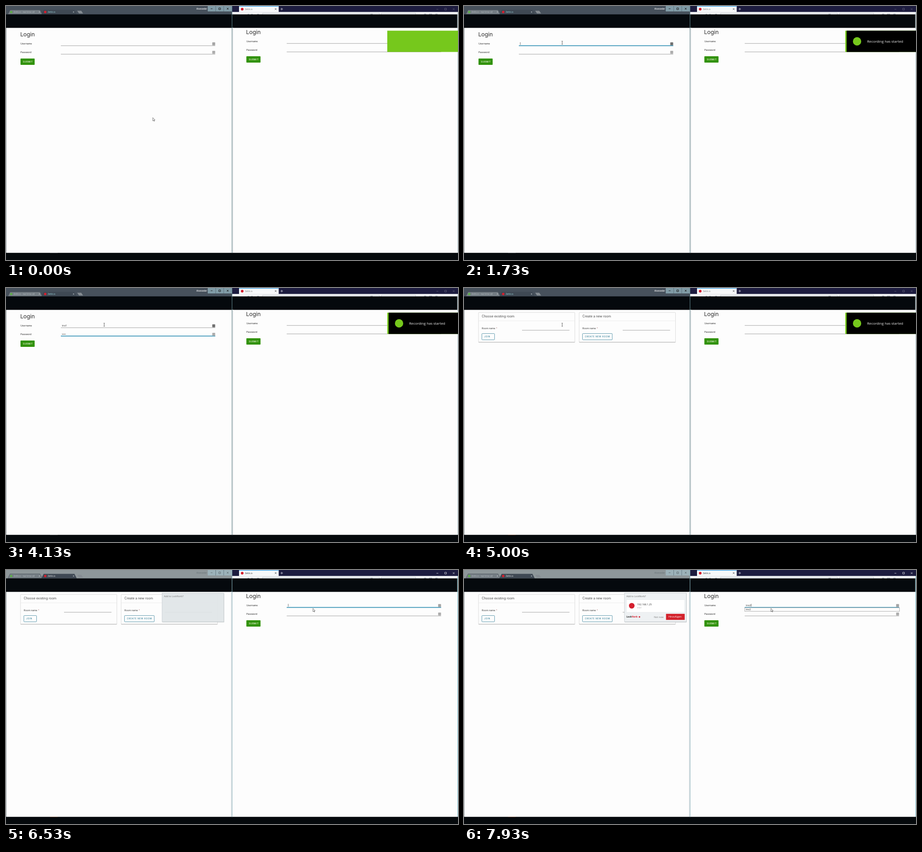
Animation, 997 px wide and 561 px high, one loop 8000 ms. Source, as an HTML page:

```html
<!DOCTYPE html>
<html lang="en">
<head>
<meta charset="utf-8">
<title>Login demo</title>
<style>
html, body { margin: 0; width: 100%; height: 100%; overflow: hidden; background: #fdfdfd; }
svg { display: block; width: 100vw; height: 100vh; }
text { font-family: Inter, "Open Sans", sans-serif; white-space: pre; }
.ui { font-family: "Open Sans", "Noto Sans", sans-serif; }
.btn { font-weight: 500; letter-spacing: .14em; font-size: 4.67px; }
</style>
</head>
<body>
<svg id="stage" viewBox="0 0 997 561" preserveAspectRatio="none"></svg>
<script>
const LOOP = 8000;
const SITE = 'Zeltik.io', USER1 = 'trio1', USER2 = 'trio2';
const RED = '#d4202f', GREEN = '#76c81c', TEAL = '#36809a';

const rect = (x, y, w, h, fill, more = '') =>
  `<rect x="${x}" y="${y}" width="${w}" height="${h}" fill="${fill}" ${more}/>`;
const text = (x, y, size, fill, str, more = '') =>
  `<text x="${x}" y="${y}" font-size="${size}" fill="${fill}" ${more}>${str}</text>`;
const ui = (x, y, size, fill, str, more = '') => text(x, y, size, fill, str, 'class="ui" ' + more);
const dot = (x, y, r, fill) => `<circle cx="${x}" cy="${y}" r="${r}" fill="${fill}"/>`;
const line = (d, stroke, w = .8, more = '') =>
  `<path d="${d}" fill="none" stroke="${stroke}" stroke-width="${w}" ${more}/>`;
const group = (id, body, more = '') => `<g id="${id}" ${more}>${body}</g>`;
const cross = (x, y, r, c, w) => line(`M${x - r} ${y - r}l${2 * r} ${2 * r}m0 ${-2 * r}l${-2 * r} ${2 * r}`, c, w);
const icon = (x, y, fill, id = '') => rect(x, y, 6.4, 6.4, fill, `rx=".8" ${id && `id="${id}"`}`);

// Login form, placed by the left end and baseline of its heading
function login(x, y, key) {
  const fx = x + 89, fw = 340.5;
  const label = (dy, s) => text(x, y + dy, 5.2, '#222', s);
  const field = (dy, id) =>
    rect(fx, y + dy, fw, .9, '#999') + rect(fx, y + dy - .5, 0, 1.6, '#2c8fb5', `id="${key}${id}Line"`);
  return text(x - .6, y, 12.3, '#2b2b2b', 'Login')
    + label(18.8, 'Username') + label(37.6, 'Password')
    + field(20.8, 'User') + field(39.4, 'Pass')
    + icon(fx + 334, y + 13.8, '#a5a5a5', key + 'Icon') + icon(fx + 334, y + 32.5, '#adadad')
    + rect(x, y + 49.6, 31.2, 14, '#319207', 'rx="1"')
    + text(x + 5.2, y + 58.4, 4.67, '#fff', 'SUBMIT', 'class="btn"')
    + text(fx + 2.5, y + 18.8, 5.2, '#333', '', `id="${key}User"`);
}

function card(x, title, button, bw) {
  return rect(x, 54, 212.5, 65.8, '#fdfdfd', 'stroke="#d2d2d2" stroke-width=".8" rx="1"')
    + rect(x, 119.2, 212.5, 1, '#adadad') + rect(x, 72.2, 212.5, .6, '#e4e4e4')
    + text(x + 7.3, 65.2, 7, '#444', title)
    + text(x + 7.3, 91, 5.3, '#333', 'Room name') + text(x + 38.8, 91, 5, '#a66', '*')
    + rect(x + 96, 92.8, 104.6, .9, '#999')
    + rect(x + 7.4, 100.6, bw, 13.8, '#fdfdfd', `rx="1" stroke="${TEAL}" stroke-width=".8"`)
    + text(x + 12.4, 109.2, 4.67, TEAL, button, 'class="btn"');
}

function leftBar() {
  return rect(0, 0, 498, 19, '#47515c', 'id="bar"')
    + '<path d="M4 18.5L9 8.5H75L80 18.5Z" fill="#747d84" stroke="#343c45" stroke-width=".5"/>'
    + '<path d="M78 18.5L83 8.5H151L156 18.5Z" fill="#3f4954"/>'
    + '<path d="M157 10.5H166L170 16.5H161Z" fill="#858c92"/>'
    + dot(11.5, 13.3, 2.6, '#5fae4b') + ui(16.5, 15, 4.5, '#b9c0c5', SITE + ' - real time coll')
    + cross(73.7, 13.3, 1.3, '#d8dcdf', .7)
    + dot(86.5, 13.3, 2.7, RED) + ui(92, 15, 4.6, '#9fdbe2', SITE, 'id="leftTab"')
    + cross(149, 13.3, 1.3, '#dde2e6', .7)
    + ui(420, 8, 4.4, '#fff', 'Alvorander', 'id="owner" font-weight="600"')
    + rect(445, 0, 53, 12, '#809ba6', 'id="winButtons"')
    + line('M462.5 0V12M480.2 0V12', '#52656f', .7)
    + group('winGlyphs', line('M451.5 6H455.5M469.4 4.2h3.8v3.8h-3.8z', '#111', .9) + cross(489, 6, 1.9, '#111', .9));
}

function rightBar() {
  return rect(499, 0, 498, 13.5, '#1d1c3f') + rect(499, 13.3, 498, 5.7, '#f3f5f7')
    + rect(514, 0, 87.5, 13.5, '#f7f8f9') + rect(514, 0, 87.5, 1.1, '#1593e6')
    + dot(521, 7, 3, RED) + ui(527, 8.8, 4.6, '#777', SITE, 'id="rightTab"')
    + cross(594.8, 6.8, 1.8, '#333', .8) + line('M605.5 6.8h5.4M608.2 4.1v5.4', '#e8e8f0', .8)
    + line('M566 19V15.8H823.5V19M828 19V15.8H903.5V19', '#b8bcc2', .7)
    + group('foxGlyphs', line('M949.5 7.2h4M967.7 5h3.8v3.8h-3.8z', '#fff', .7) + cross(987.5, 7, 1.9, '#fff', .7))
    + line('M533 18.2h3M541 18.2h3M554 18.2h4M804 18.2h5M922 18h5M933 18h7M947 18h5', '#59616c', .8);
}

const popup = rect(0, 0, 136.5, 63.5, '#98a1a6', 'transform="translate(.6 1)" opacity=".6"')
  + rect(0, 0, 136.5, 63.5, '#eef1f3', 'id="popBack" stroke="#b3babd" stroke-width=".6"')
  + ui(4.3, 9.2, 5.2, '#666', 'Add to LockNorb?')
  + group('popBody',
    rect(4.2, 14.6, 128.7, 27.6, '#fff', 'stroke="#dde1e4" stroke-width=".5"')
    + dot(16, 28, 6.2, RED) + ui(28, 27, 5.4, '#333', '192.168.1.25') + ui(28, 33.6, 4.6, '#aaa', USER1)
    + ui(4.2, 54.4, 5.1, '#222', `Lock<tspan fill="${RED}">Norb</tspan>`, 'font-weight="700"')
    + dot(33, 52.6, 1.7, RED)
    + ui(65, 54.6, 5.4, '#777', 'Not now')
    + rect(91.6, 45.8, 41.2, 13.4, '#d3222c') + ui(97, 54.4, 5.4, '#fff', 'Hinzufügen'));

const arrow = '<path d="M0 0V7.2L1.7 5.7L2.8 8L3.9 7.5L2.8 5.2H5Z" fill="#fff" stroke="#222" stroke-width=".6"/>';
const beam = line('M-1.3 -3.6H-.4L0 -3.2L.4 -3.6H1.3M0 -3.2V3.2M-1.3 3.6H-.4L0 3.2L.4 3.6H1.3', '#222', .7);
const hand = '<path d="M-.7 .3Q0 -.5 .7 .3V3L3.5 3.6Q4.3 4 4 5.5L3.3 8.2H-.6L-2.8 5Q-2.3 3.9 -.7 5Z" fill="#fff" stroke="#222" stroke-width=".6"/>';

document.getElementById('stage').innerHTML =
  rect(0, 0, 997, 561, '#fdfdfd')
  + group('formL', login(32, 66.5, 'l') + group('dots', [0, 1, 2, 3].map(i => dot(124.2 + i * 2.15, 102, .8, '#333')).join('')))
  + group('rooms', card(32, 'Choose existing room', 'JOIN', 28) + card(254, 'Create a new room', 'CREATE NEW ROOM', 65.6))
  + login(530.2, 61.5, 'r')
  + group('suggest', rect(619.2, 83.2, 341.5, 8, '#fdfdfd', 'stroke="#8b8b8b" stroke-width=".7"')
    + text(621.8, 89, 4.9, '#222', USER2))
  + rect(0, 0, .8, 546, '#7b858b')
  + leftBar() + rightBar()
  + rect(0, 18.5, 995.5, 29.8, '#05090d') + rect(0, 545.2, 997, 15.8, '#05090c')
  + rect(97, 545.2, 17, .8, '#aaa', 'id="task"')
  + rect(499, 48, 3, 497, '#eceeef', 'id="shadeR"') + rect(495.5, 48, 2.5, 497, '#eceeef', 'id="shadeL"')
  + rect(498, 0, 1.1, 545.5, '#5e7f86', 'id="seam"') + rect(996, 13, 1, 532, '#b4cdd5', 'id="edge"')
  + group('popup', popup)
  + group('toast', rect(841, 54.5, 156, 47, GREEN, 'id="toastGreen"') + rect(844, 54.5, 153, 47, '#000', 'id="toastBlack"')
    + group('toastText', dot(867, 78, 9.2, GREEN) + ui(889.2, 81.3, 7.85, '#eee', 'Recording has started')))
  + rect(0, 0, .6, 6, '#222', 'id="caret"')
  + group('cursor', group('arrow', arrow) + group('beam', beam) + group('hand', hand));

const el = {};
document.querySelectorAll('[id]').forEach(n => el[n.id] = n);
const set = (id, attrs) => { for (const k in attrs) el[id].setAttribute(k, attrs[k]); };
const show = (id, on) => set(id, { display: on ? 'inline' : 'none' });
const clamp = v => Math.max(0, Math.min(1, v));
const ramp = (t, a, b) => clamp((t - a) / (b - a));
const smooth = p => p * p * (3 - 2 * p);
const out = p => 1 - (1 - p) ** 3;
const typed = (t, times) => times.filter(k => t >= k).length;

const KEYS1 = [1850, 1990, 2140, 2280, 2450];
const KEYS_PASS = [3050, 3210, 3390, 3570];
const KEYS2 = [6990, 7130, 7280, 7430, 7600];
const FOCUS1 = 1230, TAB = 2850, SUBMIT = 4720, SWITCH = 5980, FOCUS2 = 6040;

// time, x, y
const PATH = [[0, 323.8, 246.6], [260, 323.8, 246.6], [860, 216.6, 81.2], [5250, 216.6, 81.2],
  [5760, 624.5, 79], [5840, 624.5, 79], [6000, 668, 79], [6200, 677, 84.8], [LOOP, 677, 84.8]];

function pointer(t) {
  const i = Math.max(1, PATH.findIndex(p => t < p[0]));
  const [a, b] = [PATH[i - 1], PATH[i]], p = smooth(ramp(t, a[0], b[0]));
  return [a[1] + (b[1] - a[1]) * p, a[2] + (b[2] - a[2]) * p];
}

function drawCaret(t) {
  let x, y, since;
  const last = (start, keys) => Math.max(start, ...keys.filter(k => k <= t));
  if (t >= FOCUS2) {
    x = 621.8 + el.rUser.getComputedTextLength(); y = 74.8; since = last(FOCUS2, KEYS2);
  } else if (t >= TAB && t < SUBMIT) {
    x = 123.4 + typed(t, KEYS_PASS) * 2.15; y = 99; since = last(TAB, KEYS_PASS);
  } else if (t >= FOCUS1 && t < TAB) {
    x = 123.5 + el.lUser.getComputedTextLength(); y = 80; since = last(FOCUS1, KEYS1);
  }
  const on = x !== undefined && (t - since) % 1060 < 530;
  show('caret', on);
  if (on) set('caret', { x: x + .3, y });
}

function drawToast(t) {
  const open = out(ramp(t, 90, 420)), close = ramp(t, 5650, 5910) ** 2;
  const left = 841 + 156 * ramp(t, 5910, 6150) ** 2;
  const black = t < 3000 ? 997 - 153 * open : 844 + 153 * close;
  set('toastGreen', { x: left, width: 997 - left });
  set('toastBlack', { x: black, width: 997 - black });
  set('toastText', { opacity: ramp(t, 350, 560) * (1 - ramp(t, 5480, 5640)) });
}

function drawWindows(t) {
  const away = t >= SWITCH, inside = t >= SUBMIT;
  set('bar', { fill: away ? '#8e979a' : '#47515c' });
  set('winButtons', { fill: away ? '#9cb2b9' : '#809ba6' });
  set('winGlyphs', { opacity: away ? .45 : 1 });
  set('owner', { fill: away ? '#6d777b' : '#fff' });
  set('leftTab', { fill: away ? '#eef1f3' : '#9fdbe2' });
  set('rightTab', { fill: away ? '#333' : '#777' });
  set('foxGlyphs', { opacity: away ? 1 : .35 });
  set('task', { fill: inside ? '#8a4d22' : '#6b7074', opacity: .6 });
  set('seam', { fill: t >= 5600 ? '#83a9b3' : '#5e7f86' });
  set('edge', { fill: t >= 5600 ? '#73bccd' : '#b4cdd5' });
  show('shadeR', t < 5600);
  show('shadeL', t >= 5600);
}

function draw(t) {
  show('formL', t < SUBMIT);
  show('rooms', t >= SUBMIT);
  el.lUser.textContent = USER1.slice(0, typed(t, KEYS1));
  el.rUser.textContent = USER2.slice(0, typed(t, KEYS2));
  [...el.dots.children].forEach((d, i) => d.setAttribute('opacity', t >= KEYS_PASS[i] ? 1 : 0));
  set('lIcon', { fill: t >= 820 ? '#707070' : '#a5a5a5' });
  set('lUserLine', { width: 340.5 * (t < TAB ? out(ramp(t, FOCUS1, FOCUS1 + 200)) : 1 - ramp(t, TAB, TAB + 200)) });
  set('lPassLine', { width: 340.5 * out(ramp(t, TAB, TAB + 200)) });
  set('rUserLine', { width: 340.5 * out(ramp(t, FOCUS2, FOCUS2 + 200)) });
  show('suggest', t >= KEYS2[0] + 60);

  drawWindows(t);
  drawToast(t);
  drawCaret(t);

  const pop = ramp(t, 6440, 6640);
  show('popup', pop > 0);
  set('popup', { transform: `translate(${336 + 18 * pop} 51)`, opacity: .65 + .35 * ramp(t, 6440, 6560) });
  set('popBack', { fill: t < 6640 ? '#e0e5e8' : '#eef1f3' });
  set('popBody', { opacity: ramp(t, 6640, 6760) });

  const [x, y] = pointer(t);
  set('cursor', { transform: `translate(${x.toFixed(2)} ${y.toFixed(2)})` });
  const isBeam = (t > 820 && t < 5290) || (t >= 5960 && t < 6100), isHand = t >= 5740 && t < 5860;
  show('beam', isBeam);
  show('hand', isHand);
  show('arrow', !isBeam && !isHand);
}

const start = performance.now();
function tick() {
  draw((performance.now() - start) % LOOP);
  requestAnimationFrame(tick);
}
draw(0);
requestAnimationFrame(tick);
</script>
</body>
</html>
```
